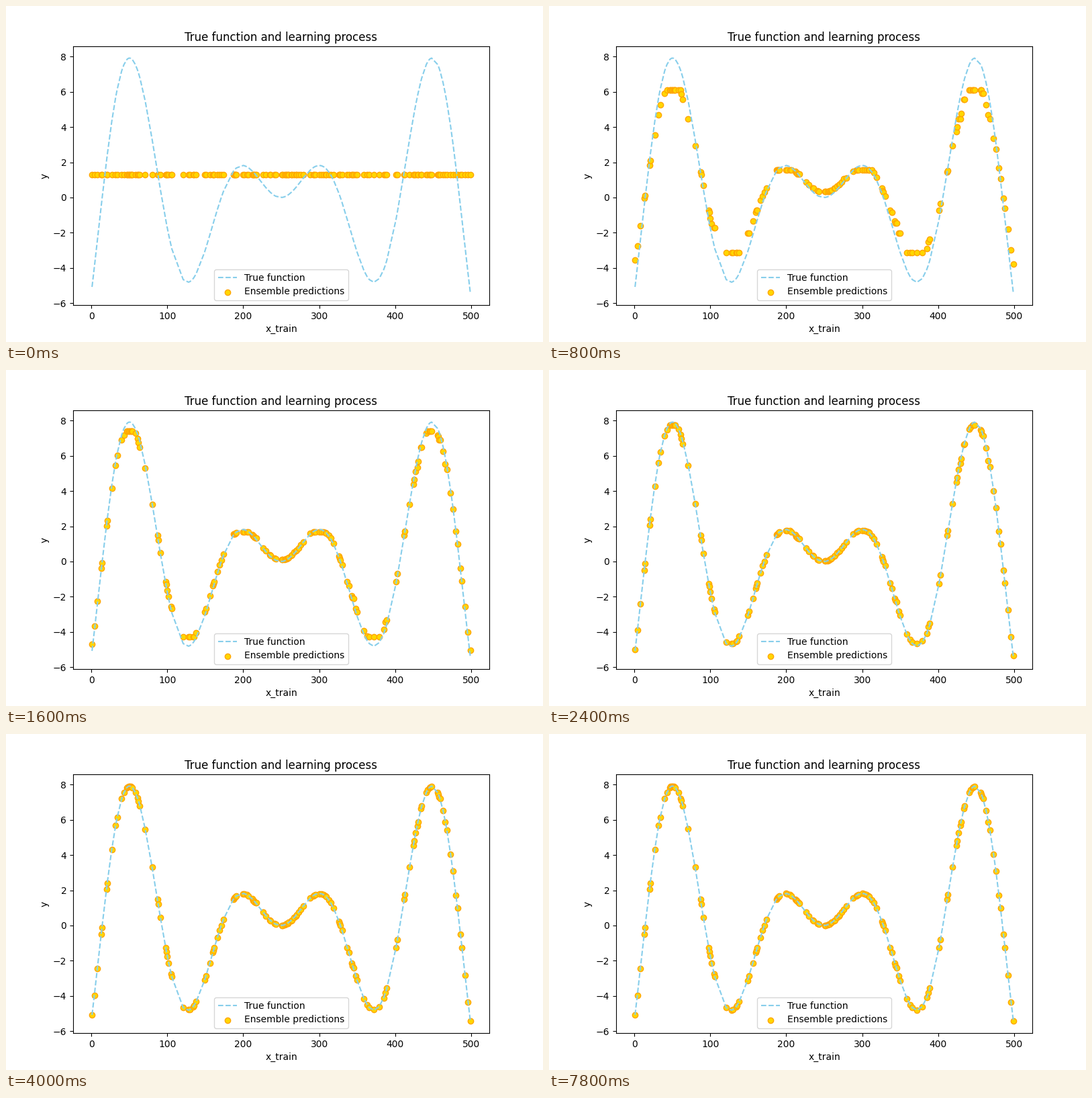
These frames come from a looping animation (800 by 500 pixels, 8 s). A matplotlib script:

```python
import numpy as np
import matplotlib.pyplot as plt
from matplotlib.animation import FuncAnimation

GRID = 500
TRAIN = 150
ROUNDS = 40
RATE = 0.3
DEPTH = 5

# A shuffled share of the grid over [-10, 10] is used for training
shuffled = np.random.RandomState(42).permutation(GRID)
idx = np.sort(shuffled[GRID - TRAIN:])
x = np.linspace(-10, 10, GRID)[idx]
y = x * np.sin(x)


def fit_tree(key, res, depth):
    """Predictions of a greedy regression tree on data sorted by key."""
    n = len(res)
    flat = np.full(n, res.mean())
    if depth == 0 or n < 2:
        return flat
    left = np.cumsum(res)[:-1]
    size = np.arange(1, n)
    gain = left**2 / size + (res.sum() - left)**2 / (n - size)
    gain[key[1:] == key[:-1]] = -np.inf
    cut = int(np.argmax(gain)) + 1
    if not np.isfinite(gain[cut - 1]):
        return flat
    return np.concatenate([fit_tree(key[:cut], res[:cut], depth - 1),
                           fit_tree(key[cut:], res[cut:], depth - 1)])


def boost():
    """Predictions after each boosting round, starting from the mean."""
    key = np.abs(2 * idx - (GRID - 1))  # distance from the centre
    order = np.argsort(key, kind="stable")
    pred = np.full(len(y), y.mean())
    rounds = [pred.copy()]
    for _ in range(ROUNDS - 1):
        res = (y - pred)[order]
        pred[order] += RATE * fit_tree(key[order], res, DEPTH)
        rounds.append(pred.copy())
    return rounds


preds = boost()

fig, ax = plt.subplots(figsize=(8, 5), dpi=100)
ax.plot(idx, y, "--", color="skyblue", label="True function")
dots = ax.scatter(idx, preds[0], color="gold", edgecolors="orange",
                  label="Ensemble predictions")
ax.set_title("True function and learning process")
ax.set_xlabel("x_train")
ax.set_ylabel("y")
ax.legend(loc="lower center")


def update(step):
    dots.set_offsets(np.column_stack([idx, preds[step]]))
    return (dots,)


anim = FuncAnimation(fig, update, frames=ROUNDS, interval=200,
                     repeat=True, repeat_delay=0)
plt.show()
```
